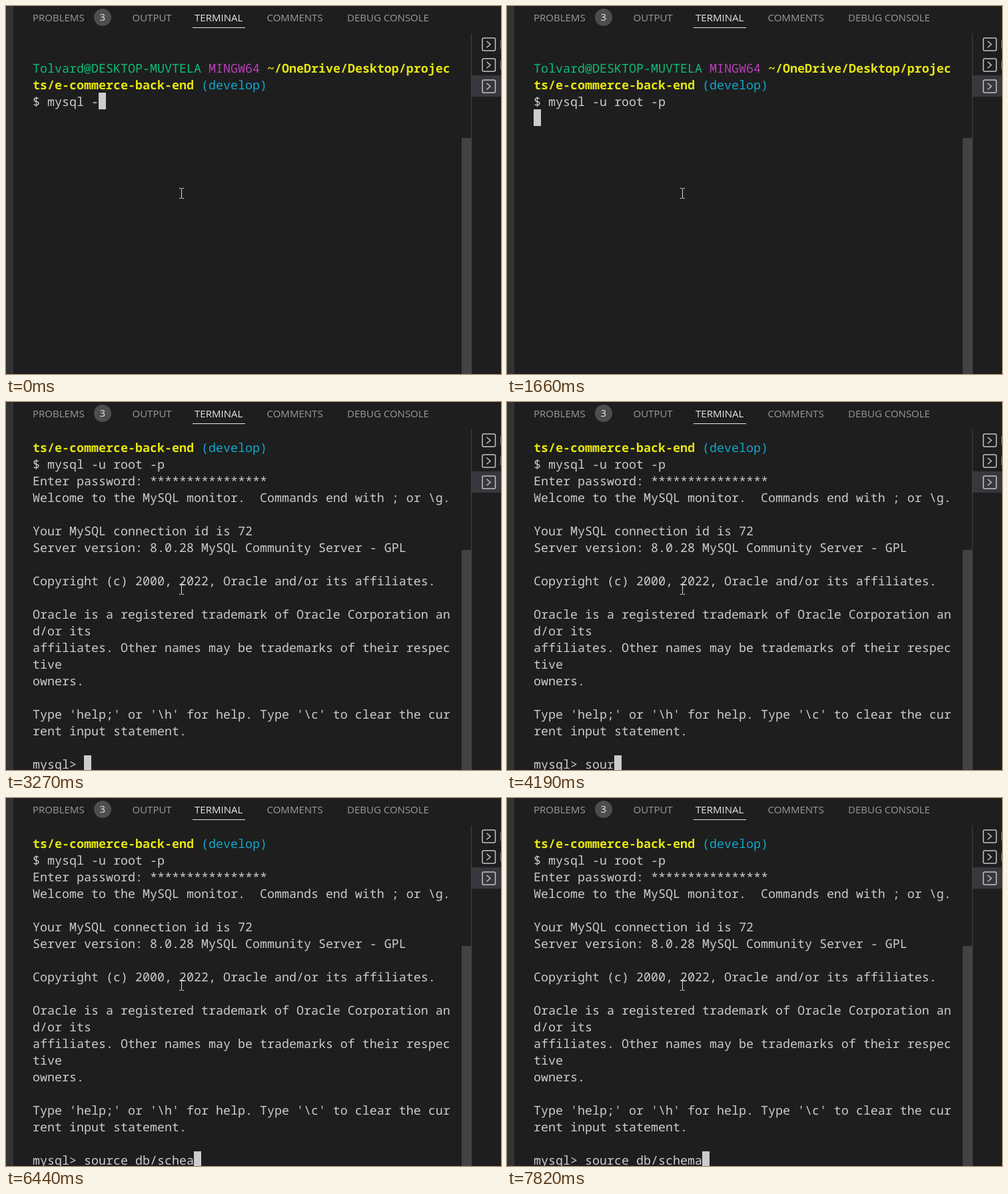
Write an HTML page that moves like this. It is 743 px wide and 552 px high and loops after 8000 ms.

```html
<!DOCTYPE html>
<html lang="en">
<head>
<meta charset="utf-8">
<title>Terminal</title>
<style>
  html, body { margin: 0; width: 100%; height: 100%; overflow: hidden; background: #1e1e1e; }
  #term {
    position: absolute; left: 40px; top: 56px; width: 640px; height: 496px; overflow: hidden;
    white-space: pre; color: #ccc;
    font: 500 18.33px/25px "Noto Sans Mono", monospace;
    font-variant-ligatures: none; text-rendering: geometricPrecision;
  }
  #term i {
    display: inline-block; position: relative; top: -1px;
    width: 11px; height: 25px; vertical-align: top; background: #ccc;
  }
  .user { color: #0dbc79; }
  .sys { color: #bc3fbc; }
  .branch { color: #11a8cd; }
  b { color: #e5e510; }
  svg { position: absolute; left: 0; top: 0; }
  svg text { font: 15px "Open Sans", sans-serif; fill: #9a9a9a; }
  svg .on { fill: #e7e7e7; }
</style>
</head>
<body>
<div id="term"></div>
<svg width="743" height="552" viewBox="0 0 743 552">
  <defs>
    <g id="shell" fill="none" stroke="#c5c5c5" stroke-width="1.5">
      <rect x="715" y="-9.5" width="19.5" height="19" rx="2"/>
      <path d="M721.5 -4.8L727 0L721.5 4.8"/>
    </g>
  </defs>
  <rect width="11" height="552" fill="#333"/>
  <text x="40" y="23">PROBLEMS</text>
  <circle cx="145" cy="17" r="13" fill="#4d4d4d"/>
  <text class="on" x="144.7" y="22" text-anchor="middle">3</text>
  <text x="189.5" y="23">OUTPUT</text>
  <text class="on" x="283" y="23">TERMINAL</text>
  <rect x="280" y="32" width="79" height="1" fill="#e7e7e7"/>
  <text x="391.5" y="23">COMMENTS</text>
  <text x="512" y="23">DEBUG CONSOLE</text>
  <rect id="bar" x="684" width="14" height="354" fill="#434343"/>
  <rect x="698" y="41" width="1" height="511" fill="#444"/>
  <rect x="699" y="104" width="44" height="32" fill="#37373d"/>
  <use href="#shell" y="57.5"/>
  <use href="#shell" y="88.5"/>
  <use href="#shell" y="120.5"/>
  <path d="M742.5 51V64M742.5 82V95" stroke="#777"/>
  <path d="M260 273.5H262.5L263.5 274.5L264.5 273.5H267M263.5 274V288M260 288.5H262.5L263.5 287.5L264.5 288.5H267" fill="none" stroke="#ddd"/>
</svg>
<script>
const LOOP = 8000, LOGIN = 3270;
const term = document.getElementById('term');
const bar = document.getElementById('bar');

const user = '\n<span class="user">Tolvard@DESKTOP-MUVTELA</span> <span class="sys">MINGW64</span> <b>~/OneDrive/Desktop/projec</b>\n';
const path = '<b>ts/e-commerce-back-end</b> <span class="branch">(develop)</span>\n';
const welcome = String.raw`
Welcome to the MySQL monitor.  Commands end with ; or \g.

Your MySQL connection id is 72
Server version: 8.0.28 MySQL Community Server - GPL

Copyright (c) 2000, 2022, Oracle and/or its affiliates.

Oracle is a registered trademark of Oracle Corporation an
d/or its
affiliates. Other names may be trademarks of their respec
tive
owners.

Type 'help;' or '\h' for help. Type '\c' to clear the cur
rent input statement.

mysql&gt; `;

// [time in ms, text added]; '<' is a backspace
const keys = [
  [0, '$ mysql -'], [90, 'u'], [240, ' '], [460, 'r'], [480, 'o'],
  [660, 'o'], [740, 't'], [810, ' '], [990, '-'], [1260, 'p'],
  [1660, '\n'], [1690, 'Enter password: '],
  [2530, '*'.repeat(15)], [2560, '*'],
  [LOGIN, welcome],
  [3760, 's'], [3880, 'o'], [4130, 'u'], [4190, 'r'], [4460, 'c'], [4490, 'e'],
  [4670, ' '], [5040, 'd'], [5220, 'b'], [5690, '/'],
  [5840, 's'], [6020, 'c'], [6200, 'h'], [6350, 'e'], [6440, 'a'], [6590, 'm'],
  [6900, '<'], [7020, '<'], [7270, 'm'], [7350, 'a'], [7420, ','], [7820, '<']
];

const typed = t => keys.reduce((s, [at, k]) =>
  at > t ? s : k === '<' ? s.slice(0, -1) : s + k, '');

let shown;
function draw(now) {
  const t = now % LOOP, before = t < LOGIN;
  const html = (before ? user : '') + path + typed(t) + '<i></i>';
  if (html !== shown) {
    term.innerHTML = shown = html;
    bar.setAttribute('y', before ? 198 : 222);
  }
}

const start = performance.now();
function tick() {
  draw(performance.now() - start);
  requestAnimationFrame(tick);
}
tick();
</script>
</body>
</html>
```
